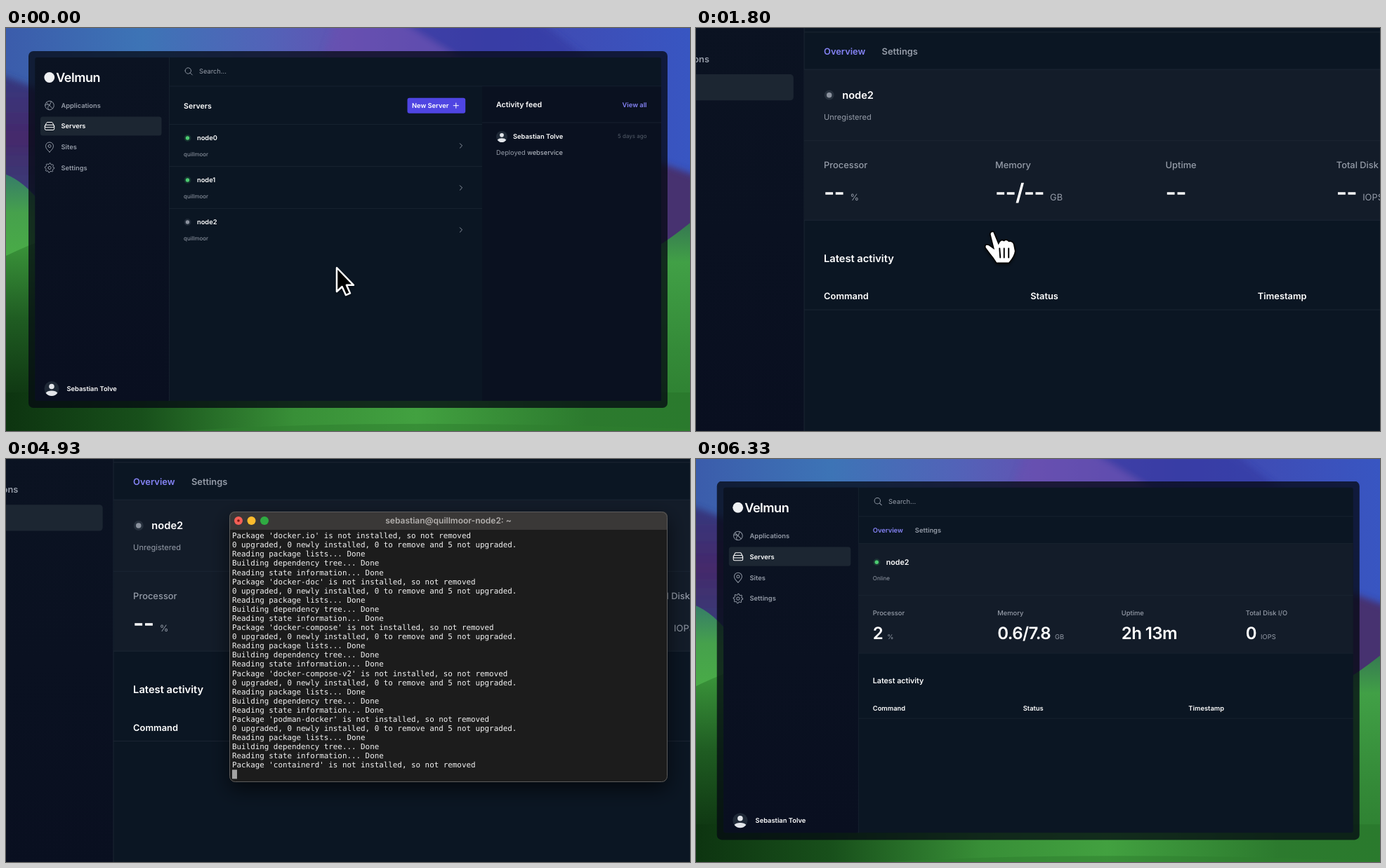
An HTML page that plays this animation: 974x575 px, repeating every 6.39 s.

```html
<!DOCTYPE html>
<html lang="en">
<head>
<meta charset="utf-8">
<title>Server dashboard</title>
<style>
  html, body { margin: 0; width: 100%; height: 100%; overflow: hidden; background: #0b1623; }
  svg { display: block; }
  text { font: 400 9.3px Inter, "Open Sans", sans-serif; fill: #fff; text-rendering: geometricPrecision; white-space: pre; }
  .b { font-weight: 600; }
  .m { font-weight: 500; }
  .h { font-weight: 600; font-size: 10.6px; }
  .s { font-size: 8px; }
  .dim { fill: #959ca8; }
  .faint { fill: #535c69; }
  .link { fill: #8583f5; }
  .end { text-anchor: end; }
  .big { font-size: 23.9px; font-weight: 600; letter-spacing: -.6px; }
  .unit { font-size: 9.3px; font-weight: 400; letter-spacing: 0; fill: #959ca8; }
  .logo { font-size: 18px; font-weight: 600; letter-spacing: -.5px; }
  .rule { stroke: #1c2734; stroke-width: .7; }
  .icon { fill: none; stroke: #8d95a1; stroke-width: 1; stroke-linecap: round; stroke-linejoin: round; }
  .on .icon { stroke: #fff; }
  .term text { font: 10.87px "DejaVu Sans Mono", "Liberation Mono", monospace; fill: #f2f2f2; }
  .term .title { font: 600 12px Inter, sans-serif; fill: #b3b0ae; text-anchor: middle; }
  .user { fill: #35c934; font-weight: 700; }
  .path { fill: #6666e8; font-weight: 700; }
</style>
</head>
<body>
<svg id="stage" width="974" height="575" viewBox="0 0 974 575"></svg>
<script>
const LOOP = 6390, FRAME = 1000 / 15;
const CX = 438, CY = 285, ZOOM = 0.387;
const PERSON = 'Sebastian Tolve', HOST = 'quillmoor';

const text = (x, y, cls, str) => `<text x="${x}" y="${y}" class="${cls}">${str}</text>`;
const rule = (x1, x2, y) => `<line class="rule" x1="${x1}" x2="${x2}" y1="${y}" y2="${y}"/>`;
const rect = (x, y, w, h, fill, rx = 0) => `<rect x="${x}" y="${y}" width="${w}" height="${h}" rx="${rx}" fill="${fill}"/>`;
const circle = (x, y, r, fill) => `<circle cx="${x}" cy="${y}" r="${r}" fill="${fill}"/>`;
const icon = (x, y, d) => `<path class="icon" transform="translate(${x} ${y})" d="${d}"/>`;
const dot = (x, y, color) => `<g fill="${color}">
  <circle cx="${x}" cy="${y}" r="5" opacity=".17"/><circle cx="${x}" cy="${y}" r="2.7"/></g>`;
const avatar = (x, y, r) => `<g transform="translate(${x} ${y}) scale(${r / 10})">
  <circle r="10" fill="#1f2937"/><circle cy="-2.8" r="3.6" fill="#e2e5ea"/>
  <path d="M-8 6A9 5.6 0 0 1 8 6A10 10 0 0 1 -8 6Z" fill="#e2e5ea"/></g>`;

const GREEN = '#4ccb71', GRAY = '#8b929e';
const ring = r => `M${-r} 0A${r} ${r} 0 1 1 ${r} 0A${r} ${r} 0 1 1 ${-r} 0`;
const gear = () => {
  let d = '';
  for (let i = 0; i < 32; i++) {
    const a = i * Math.PI / 16, r = i % 4 < 2 ? 6.7 : 5.2;
    d += `${i ? 'L' : 'M'}${(r * Math.cos(a)).toFixed(2)} ${(r * Math.sin(a)).toFixed(2)}`;
  }
  return d + 'Z' + ring(2.1);
};

const wallpaper = () => `
  ${rect(0, 0, 974, 575, 'url(#sky)')}
  <g filter="url(#soft)">
    <path d="M-20 62L60 92L60 250L-20 216Z" fill="url(#plum)"/>
    <path d="M470 -10L560 -10L650 45L450 45Z" fill="#6a4fb0" opacity=".6"/>
    <path d="M560 -10L760 -10L830 45L650 45Z" fill="#3438a0" opacity=".6"/>
    <path d="M925 190L995 215L995 320L925 320Z" fill="#47306f"/>
  </g>
  <path d="M-10 206Q20 212 50 250V590H-10Z" fill="url(#leaf)"/>
  <path d="M-10 330Q30 310 60 300V590H-10Z" fill="url(#moss)"/>
  <path d="M930 310Q950 298 984 270V590H930Z" fill="url(#leafR)"/>
  ${rect(0, 520, 974, 55, 'url(#grass)')}
  <path d="M250 575Q520 556 974 572V575Z" fill="#2e7f2f" opacity=".5"/>`;

const gradient = (id, dir, ...stops) => `<linearGradient id="${id}" ${dir === 'v' ? 'x2="0" y2="1"' : ''}>
  ${stops.map(([at, c]) => `<stop offset="${at}" stop-color="${c}"/>`).join('')}</linearGradient>`;

const defs = `<defs>
  ${gradient('sky', 'h', [0, '#3b5cab'], [.2, '#3d74b6'], [.38, '#5263b8'], [.5, '#6253b2'], [.7, '#4346ac'], [1, '#3856c2'])}
  ${gradient('plum', 'v', [0, '#343a80'], [.5, '#45296b'], [1, '#36407a'])}
  ${gradient('leaf', 'v', [0, '#357a6a'], [.15, '#46a14c'], [.35, '#4aae46'], [1, '#123a15'])}
  ${gradient('moss', 'v', [0, '#3c983c'], [.4, '#1f5c22'], [.85, '#0c300f'], [1, '#0d3410'])}
  ${gradient('leafR', 'v', [0, '#347254'], [.2, '#41a046'], [.6, '#348a38'], [1, '#2a7a2d'])}
  ${gradient('grass', 'h', [0, '#0d3410'], [.2, '#18501b'], [.42, '#388f37'], [.6, '#42a140'], [.85, '#2c7a2e'], [1, '#2a7a2d'])}
  ${gradient('side', 'v', [0, '#0b1322'], [1, '#090f20'])}
  <filter id="soft"><feGaussianBlur stdDeviation="5"/></filter>
  <filter id="shade" x="-20%" y="-20%" width="140%" height="150%">
    <feDropShadow dx="0" dy="10" stdDeviation="14" flood-opacity=".6"/></filter>
  <filter id="drop" x="-40%" y="-40%" width="180%" height="180%">
    <feDropShadow dx="0" dy="2" stdDeviation="2" flood-opacity=".5"/></filter>
</defs>`;

const NAV = [
  ['Applications', 110.5, ring(6.3) + 'M-4.5 -4.3L0 0L4.4 4.4M0 0L2.5 -5.6M0 0C-3 1 -3 4 -1 6M-6 -1C-3 -2 -2 -1 0 0'],
  ['Servers', 140, 'M-6.5 0L-4.5 -4.5Q-4 -5.5 -3 -5.5H3Q4 -5.5 4.5 -4.5L6.5 0M-5 -1.7H5Q6.7 -1.7 6.7 0T5 1.8H-5Q-6.7 1.8 -6.7 0T-5 -1.7M-6.7 0V3.7Q-6.7 5.5 -5 5.5H5Q6.7 5.5 6.7 3.7V0'],
  ['Sites', 170, 'M0 7C-3 4 -5.5 1.5 -5.5 -1.5A5.5 5.5 0 0 1 5.5 -1.5C5.5 1.5 3 4 0 7ZM-2 -1.5A2 2 0 1 1 2 -1.5A2 2 0 1 1 -2 -1.5'],
  ['Settings', 199.5, gear()]
];
const navItem = ([name, y, d]) => {
  const on = name === 'Servers';
  return `<g class="${on ? 'on' : ''}">${on ? rect(49, 126.5, 172.5, 27, '#1c2632', 3.5) : ''}
    ${icon(62, y, d)}${text(78.5, y + 3.4, on ? 'b' : 'b dim', name)}</g>`;
};

const shell = () => `
  ${rect(32, 33, 910, 509, 'rgba(5,9,18,.76)', 7)}
  ${rect(41.5, 42, 891.5, 490, '#0b1623', 3)}
  ${rect(41.5, 42, 191, 490, 'url(#side)', 3)}
  <line class="rule" x1="232.5" x2="232.5" y1="42" y2="532"/>
  ${circle(61.8, 70.5, 7.4, '#eef0f3')}
  ${text(71.3, 76.8, 'logo', 'Velmun')}
  ${NAV.map(navItem).join('')}
  ${avatar(65, 514.5, 10.5)}${text(86.5, 517.6, 'b', PERSON)}
  ${icon(259.3, 61, ring(4.2) + 'M3 3L6 6')}
  ${text(275, 65, 'dim', 'Search...')}
  ${rule(232.5, 933, 83)}`;

const serverRow = (n, color) => {
  const y = 157 + n * 60;
  return dot(258.5, y, color) + text(272, y + 3.3, 'b', 'node' + n) + text(253, y + 25.6, 's dim', HOST)
    + icon(648, y + 11, 'M-1.6 -3.2L1.6 0L-1.6 3.2') + (n ? rule(232.5, 678, y - 19.5) : '');
};

const listPage = () => `
  ${rect(678, 83.5, 255, 448.5, '#0a1120')}
  ${text(253, 114.5, 'h', 'Servers')}
  ${rect(571.5, 99.7, 82.7, 22, '#4f45e2', 3)}
  ${text(578, 114, 'b', 'New Server')}
  <path d="M636.8 110.7H644.8M640.8 106.7V114.7" stroke="#fff" stroke-width="1"/>
  ${rule(232.5, 678, 137.5)}
  ${[GREEN, GREEN, GRAY].map((c, i) => serverRow(i, c)).join('')}
  ${text(698, 113, 'h', 'Activity feed')}
  ${text(912.5, 112.6, 'b link end', 'View all')}
  ${rule(678, 933, 135)}
  ${avatar(706, 155, 8)}${text(722, 157.8, 'b', PERSON)}
  ${text(912.5, 157.2, 's faint end', '5 days ago')}
  ${text(698, 180.5, 'dim', 'Deployed <tspan fill="#c3c8d0">webservice</tspan>')}`;

const stat = (x, label, value, unit) => text(x, 223.7, 'm dim', label)
  + text(x, 256.8, 'big', value + (unit ? `<tspan class="unit" dx="6">${unit}</tspan>` : ''));

const nodePage = (status, color, cpu, mem, up, disk) => `
  ${text(252.8, 106, 'b link', 'Overview')}${text(312.5, 106, 'b dim', 'Settings')}
  ${rect(232.8, 121.5, 700.2, 155.7, '#131c29')}
  ${[121.5, 195.1, 277.2, 369.7].map(y => rule(232.5, 933, y)).join('')}
  ${dot(258.3, 148, color)}${text(271.7, 151.6, 'h', 'node2')}
  ${text(252.8, 173.2, 's dim', status)}
  ${stat(252.8, 'Processor', cpu, '%')}${stat(429.3, 'Memory', mem, 'GB')}
  ${stat(604.9, 'Uptime', up)}${stat(780.9, 'Total Disk I/O', disk, 'IOPS')}
  ${text(252.8, 320.3, 'h', 'Latest activity')}
  ${text(252.8, 359, 'b', 'Command')}${text(465.6, 359, 'b', 'Status')}${text(699.9, 359, 'b', 'Timestamp')}`;

const terminal = () => `
  <g filter="url(#shade)">${rect(318, 75, 624, 386, '#1c1c1c', 8)}</g>
  <path d="M318 101V83Q318 75 326 75H934Q942 75 942 83V101Z" fill="#3a3837"/>
  <rect x="318.5" y="75.5" width="623" height="385" rx="8" fill="none" stroke="#5c5c5c"/>
  ${circle(331, 88, 6, '#f45f56')}${circle(331, 88, 1.8, '#7c150f')}
  ${circle(349.5, 88, 6, '#fdbb2d')}${circle(368, 88, 6, '#2fab42')}
  ${text(630, 92, 'title', `sebastian@${HOST}-node2: ~`)}
  <g id="rows"></g><rect id="block" width="7" height="13" fill="#a2a2a2"/>`;

const beam = 'M439 235Q461.5 231 461.5 250V314Q461.5 332 439 328M484 235Q461.5 231 461.5 250M461.5 314Q461.5 332 484 328M451 285H472';
const cursors = `
  <path id="arrow" filter="url(#drop)" d="M1 2V36L8.6 29L14 41L20 38.4L14.8 26.8H25Z"
    fill="#000" stroke="#fff" stroke-width="2.4" stroke-linejoin="round"/>
  <g id="hand" filter="url(#drop)"><g transform="translate(-423 -290)" stroke="#000" stroke-linecap="round">
    <path d="M419 294Q419 289 424 290L431 307Q434 300 439 303Q442 300 446 304Q451 303 453 308L455 318Q454 326 446 335H428Q424 328 418 321L412 313Q411 307 417 309L424 314Z" fill="#fff" stroke-width="1.6"/>
    <path d="M432.5 314L433.5 327M439 314V327M445.5 314V327" stroke-width="2"/></g></g>
  <g id="beam"><g transform="translate(-461.5 -281)" fill="none">
    <path d="${beam}" stroke="#fff" stroke-width="17.5" stroke-linejoin="round"/>
    <path d="${beam}" stroke="#111" stroke-width="6.5"/></g></g>`;

const stage = document.getElementById('stage');
stage.innerHTML = defs + `<g id="cam">${wallpaper()}${shell()}
  <g id="list">${listPage()}</g>
  <g id="idle">${nodePage('Unregistered', GRAY, '--', '--/--', '--', '--')}</g>
  <g id="live">${nodePage('Online', GREEN, '2', '0.6/7.8', '2h 13m', '0')}</g></g>
  <g id="term" class="term">${terminal()}</g>${cursors}`;

const el = id => document.getElementById(id);
const show = (id, on) => el(id).style.display = on ? '' : 'none';

const PROMPT = `<tspan class="user">sebastian@${HOST}-node2</tspan>:<tspan class="path">~</tspan>$ `;
const COMMAND = [PROMPT + 'curl -sSL https://velmun.cloud/get-velmun.sh | sudo bash -s -- du', 'll-fly-76'];
const OUTPUT = ['docker.io', 'docker-doc', 'docker-compose', 'docker-compose-v2', 'podman-docker', 'containerd', 'runc']
  .flatMap(p => [
    'Reading package lists... Done', 'Building dependency tree... Done', 'Reading state information... Done',
    `Package '${p}' is not installed, so not removed`,
    '0 upgraded, 0 newly installed, 0 to remove and 5 not upgraded.'
  ]);
const PITCH = 13.09, CHAR = 6.544, LEFT = 322, ROWS = 26;

function drawTerminal(t) {
  const entered = t >= 3860;
  let lines = t < 3330 ? [PROMPT] : COMMAND, row = lines.length - 1, col = t < 3330 ? 29 : 9;
  let marks = '';
  if (entered) {
    const count = Math.max(0, Math.floor((t - 4050) / 30));
    const all = COMMAND.concat(OUTPUT.slice(0, count));
    lines = all.slice(-ROWS);
    row = lines.length;
    col = 0;
    if (all.length <= ROWS) marks = text(315.5, 113.2, '', '[') + text(936.5, 113.2, '', ']');
  }
  el('rows').innerHTML = marks + lines.map((s, i) => text(LEFT, 113.2 + i * PITCH, '', s)).join('');
  el('block').setAttribute('x', LEFT + col * CHAR);
  el('block').setAttribute('y', 103 + row * PITCH);
}

// Overdamped spring: 1 at rest, falling to 0
function settle(ms) {
  const t = Math.max(0, ms) / 1000, p = 4.87, q = 10.9;
  return (q * Math.exp(-p * t) - p * Math.exp(-q * t)) / (q - p);
}
const smooth = (t, a, b) => {
  const u = Math.min(1, Math.max(0, (t - a) / (b - a)));
  return u * u * (3 - 2 * u);
};

function draw(t) {
  const s = 1 + ZOOM * (t < 5340 ? 1 - settle(t - 795) : settle(t - 5340));
  el('cam').setAttribute('transform', `translate(${CX} ${CY}) scale(${s}) translate(${-CX} ${-CY})`);

  const closed = t >= 5260, open = t >= 2390 && !closed;
  show('list', t < 1390);
  show('idle', t >= 1390 && !closed);
  show('live', closed);
  show('term', open);
  if (open) drawTerminal(t);

  const go = smooth(t, 400, 1210), over = smooth(t, 2330, 2730);
  const x = CX + (470 - 43 * go + 28 * over - CX) * s;
  const y = CY + (340 - 51 * go - 7 * over - CY) * s;
  const kind = t < 930 ? 'arrow' : t < 2530 ? 'hand' : t < 4120 ? 'beam' : '';
  for (const id of ['arrow', 'hand', 'beam']) show(id, id === kind);
  if (kind) {
    const size = kind === 'arrow' ? s : s / (1 + ZOOM);
    el(kind).setAttribute('transform', `translate(${x} ${y}) scale(${size})`);
  }
}

const start = performance.now();
function tick() {
  const t = (performance.now() - start) % LOOP;
  draw(Math.floor((t + 5) / FRAME) * FRAME);
  requestAnimationFrame(tick);
}
tick();
</script>
</body>
</html>
```
